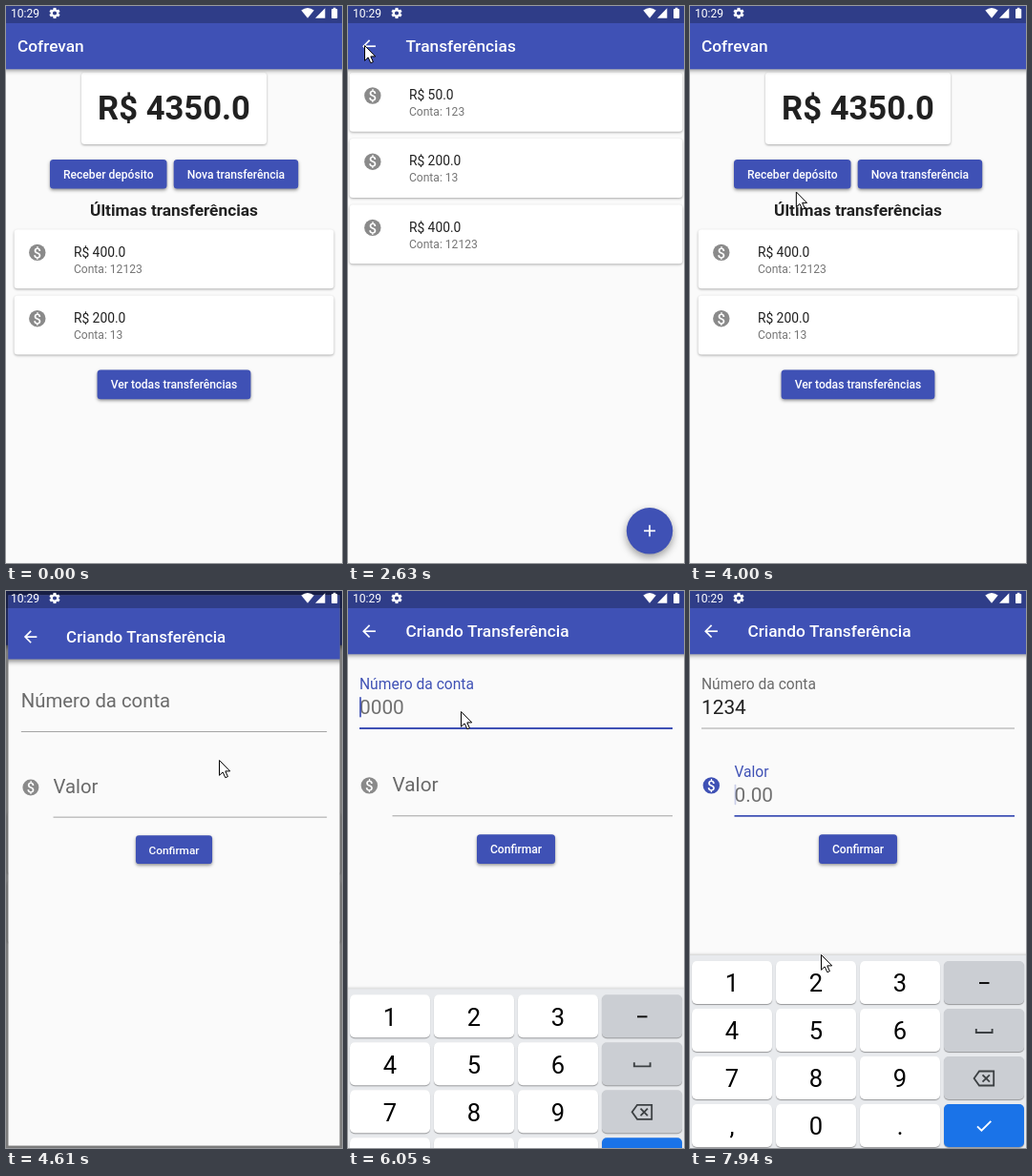
Write an HTML page with a canvas that moves like this. It is 352 by 584 pixels and loops after 8000 ms.

```html
<!DOCTYPE html>
<html lang="pt">
<head>
<meta charset="utf-8">
<style>
html, body { margin: 0; width: 352px; height: 584px; overflow: hidden; background: #fafafa; }
canvas { display: block; }
</style>
</head>
<body>
<canvas id="stage" width="352" height="584"></canvas>
<script>
const ctx = document.getElementById('stage').getContext('2d');
const LOOP = 8000, U = 0.865; // U: pixels per layout unit
const INDIGO = '#3f51b5', DARK = '#212121', GREY = '#757575', PAPER = '#fafafa';
const SCREEN = { x: -1.9, y: -2.7, w: 355.8, h: 591.4, cx: 176, cy: 293 };

const clamp = v => Math.max(0, Math.min(1, v));
const span = (t, start, length) => clamp((t - start) / length);
const mix = (a, b, p) => a + (b - a) * p;
const smooth = p => p * p * (3 - 2 * p);
const easeOut = (p, n) => 1 - (1 - p) ** n;

function text(str, x, y, size, color, weight = 400, align = 'left') {
  ctx.font = `${weight} ${size}px Roboto, sans-serif`;
  ctx.textAlign = align;
  ctx.fillStyle = color;
  ctx.fillText(str, x, y);
}

function box(x, y, w, h, r, color, shade) {
  ctx.save();
  if (shade) {
    ctx.shadowColor = `rgba(0,0,0,${shade[2]})`;
    ctx.shadowOffsetY = shade[0];
    ctx.shadowBlur = shade[1];
  }
  ctx.fillStyle = color;
  ctx.beginPath();
  ctx.roundRect(x, y, w, h, r);
  ctx.fill();
  ctx.restore();
}

function disc(x, y, r, color) {
  ctx.fillStyle = color;
  ctx.beginPath();
  ctx.arc(x, y, r, 0, 7);
  ctx.fill();
}

function line(points, color, width) {
  ctx.strokeStyle = color;
  ctx.lineWidth = width;
  ctx.beginPath();
  points.forEach(([x, y]) => ctx.lineTo(x, y));
  ctx.stroke();
}

function poly(points, color) {
  ctx.fillStyle = color;
  ctx.beginPath();
  points.forEach(([x, y]) => ctx.lineTo(x, y));
  ctx.fill();
}

function coin(x, y, color) {
  disc(x, y, 8.7, color);
  text('$', x, y + 5.2, 15, '#fff', 500, 'center');
}

function card(x, y, w, h) {
  box(x, y, w, h, 3.5, '#fff', [1, 2.5, 0.32]);
}

function button(x, y, w, label) {
  box(x, y, w, 30.6, 3.5, INDIGO, [1.6, 3.5, 0.42]);
  text(label, x + w / 2, y + 19.8, 12.1, '#fff', 500, 'center');
}

function appBar(title, back) {
  box(-10, -10, 372, 76.3, 0, INDIGO, [2, 5, 0.45]);
  text(title, back ? 60.4 : 12, 48.3, 17.3, '#fff', 500);
  if (back) {
    line([[28.9, 42.2], [16.6, 42.2]], '#fff', 1.7);
    line([[22.6, 35.9], [16.3, 42.2], [22.6, 48.5]], '#fff', 1.7);
  }
}

function transferRow(x, y, w, value, account) {
  card(x, y, w, 62);
  coin(x + 24.2, y + 24.2, '#8a8a8a');
  text('R$ ' + value, x + 62.3, y + 28.3, 13.84, DARK);
  text('Conta: ' + account, x + 62.3, y + 45.3, 12.1, GREY);
}

function homePage() {
  card(79, 69.5, 194, 75.5);
  text('R$ 4350.0', 176, 119, 34.6, DARK, 700, 'center');
  button(46, 161, 122.5, 'Receber depósito');
  button(175.7, 161, 130.5, 'Nova transferência');
  text('Últimas transferências', 176, 220.2, 17.3, DARK, 700, 'center');
  transferRow(8.6, 234.2, 334.8, '400.0', '12123');
  transferRow(8.6, 303.5, 334.8, '200.0', '13');
  button(95.6, 381.6, 160.8, 'Ver todas transferências');
  appBar('Cofrevan', false);
}

function listPage() {
  [['50.0', '123'], ['200.0', '13'], ['400.0', '12123']].forEach(([value, account], i) =>
    transferRow(1.6, 69.8 + i * 69.2, 348.8, value, account));
  ctx.save();
  ctx.shadowColor = 'rgba(0,0,0,.4)';
  ctx.shadowOffsetY = 3.5;
  ctx.shadowBlur = 8;
  disc(316, 550.3, 24.2, INDIGO);
  ctx.restore();
  line([[310, 550.3], [322, 550.3]], '#fff', 1.7);
  line([[316, 544.3], [316, 556.3]], '#fff', 1.7);
  appBar('Transferências', true);
}

// rise: how far the label has floated up; base: height of the underline
function field(x, base, label, hint, value, rise, focused, caret) {
  text(label, x, base - mix(25.8, 41, rise), 20.8 * mix(1, 0.75, rise), focused ? INDIGO : '#6a6a6a');
  if (value) {
    text(value, x, base - 14.9, 20.8, DARK);
  } else if (rise > 0) {
    ctx.save();
    ctx.globalAlpha *= rise;
    text(hint, x, base - 14.9, 20.8, '#707070');
    ctx.restore();
  }
  if (focused) {
    line([[x, base], [340, base]], INDIGO, 1.8);
    const caretX = x + 0.9 + ctx.measureText(value).width * (value ? 1 : 0);
    ctx.save();
    ctx.globalAlpha *= caret;
    box(caretX - 0.8, base - 33, 1.7, 21.5, 0.8, INDIGO);
    ctx.restore();
  } else {
    line([[x, base], [340, base]], '#989898', 0.9);
  }
}

const FOCUS_ACCOUNT = 5610, FOCUS_VALUE = 7330;
const KEY_TIMES = [6370, 6500, 6715, 6850];

function caretAlpha(t, since) {
  const phase = (t - since) % 1000;
  return phase < 500 ? 1 : phase < 850 ? 1 - span(phase, 500, 150) : span(phase, 850, 150);
}

function formPage(t) {
  const typed = KEY_TIMES.filter(k => t >= k);
  const onAccount = t >= FOCUS_ACCOUNT && t < FOCUS_VALUE;
  const onValue = t >= FOCUS_VALUE;
  const lastEdit = typed.length ? typed[typed.length - 1] : FOCUS_ACCOUNT;
  field(12, 144, 'Número da conta', '0000', '1234'.slice(0, typed.length),
    smooth(span(t, FOCUS_ACCOUNT, 200)), onAccount, caretAlpha(t, lastEdit));
  coin(22.3, 203.9, onValue ? INDIGO : '#8a8a8a');
  field(46.5, 235.8, 'Valor', '0.00', '',
    smooth(span(t, FOCUS_VALUE, 200)), onValue, caretAlpha(t, FOCUS_VALUE));
  button(135, 255.3, 82, 'Confirmar');
  appBar('Criando Transferência', true);
}

function page(draw, t, scale = 1, alpha = 1) {
  ctx.save();
  ctx.globalAlpha = alpha;
  ctx.translate(SCREEN.cx, SCREEN.cy);
  ctx.scale(scale, scale);
  ctx.translate(-SCREEN.cx, -SCREEN.cy);
  ctx.beginPath();
  ctx.rect(SCREEN.x, SCREEN.y, SCREEN.w, SCREEN.h);
  ctx.clip();
  ctx.fillStyle = PAPER;
  ctx.fillRect(SCREEN.x, SCREEN.y, SCREEN.w, SCREEN.h);
  draw(t);
  ctx.restore();
}

function openPage(from, to, t, start) {
  const p = span(t, start, 300), e = easeOut(p, 5);
  page(from, t, mix(1, 1.05, e));
  ctx.fillStyle = `rgba(0,0,0,${0.5 * clamp(p * 4)})`;
  ctx.fillRect(0, 0, 352, 584);
  page(to, t, mix(0.85, 1, e), span(p, 0.125, 0.125));
}

function closePage(from, to, t, start) {
  const p = span(t, start, 480), e = easeOut(p, 5);
  page(to, t, mix(1.1, 1, e));
  const alpha = 1 - span(p, 0.08, 0.125);
  if (alpha > 0) page(from, t, mix(1, 0.9, e), alpha);
}

function pages(t) {
  if (t < 1310) page(homePage, t);
  else if (t < 1610) openPage(homePage, listPage, t, 1310);
  else if (t < 3040) page(listPage, t);
  else if (t < 3520) closePage(listPage, homePage, t, 3040);
  else if (t < 4518) page(homePage, t);
  else if (t < 4818) openPage(homePage, formPage, t, 4518);
  else page(formPage, t);
}

function statusBar() {
  ctx.fillStyle = 'rgba(0,0,0,.25)';
  ctx.fillRect(0, 0, 352, 18);
  text('10:29', 5, 12.2, 12.1, '#fff');
  for (let i = 0; i < 6; i++) {
    const a = i * Math.PI / 3 + Math.PI / 6, c = Math.cos(a), s = Math.sin(a);
    line([[51 + c * 2.8, 7.5 + s * 2.8], [51 + c * 5.6, 7.5 + s * 5.6]], '#fff', 3);
  }
  ctx.strokeStyle = '#fff';
  ctx.lineWidth = 2.2;
  ctx.beginPath();
  ctx.arc(51, 7.5, 3.2, 0, 7);
  ctx.stroke();
  ctx.fillStyle = '#fff';
  ctx.beginPath();
  ctx.moveTo(316, 12.8);
  ctx.lineTo(309.3, 4.6);
  ctx.quadraticCurveTo(316, -0.4, 322.7, 4.6);
  ctx.fill();
  poly([[324, 12.8], [334.3, 12.8], [334.3, 2.3]], '#fff');
  box(341, 3, 6.2, 10, 0.8, '#fff');
  box(342.8, 1.8, 2.6, 2, 0, '#fff');
}

function keyIcon(row) {
  const y = 411 + row * 50, ink = '#3c4043';
  if (row === 0) line([[303, y], [313.5, y]], '#111', 2);
  if (row === 1) line([[299.8, y - 2], [299.8, y + 2], [316.6, y + 2], [316.6, y - 2]], ink, 1.9);
  if (row === 2) {
    ctx.strokeStyle = ink;
    ctx.lineWidth = 1.8;
    ctx.beginPath();
    [[297.6, y], [303, y - 7.5], [318.2, y - 7.5], [318.2, y + 7.5], [303, y + 7.5]]
      .forEach(([x, py]) => ctx.lineTo(x, py));
    ctx.closePath();
    ctx.stroke();
    line([[306.5, y - 3.7], [313.9, y + 3.7]], ink, 1.8);
    line([[306.5, y + 3.7], [313.9, y - 3.7]], ink, 1.8);
  }
  if (row === 3) line([[301, y + 0.3], [305.4, y + 4.7], [315.3, y - 5.2]], '#fff', 1.9);
}

function keyboard(t) {
  const p = easeOut(span(t, 5870, 310), 2);
  if (p === 0) return;
  ctx.save();
  ctx.translate(0, 204 * (1 - p));
  box(-5, 382, 362, 240, 0, '#e8eaed', [-1, 3, 0.2]);
  ['123', '456', '789', ',0.'].forEach((keys, row) => {
    const y = 388 + row * 50;
    for (let col = 0; col < 4; col++) {
      const x = 2 + col * 88;
      const color = col < 3 ? '#fff' : row < 3 ? '#cbced3' : '#1a73e8';
      box(x, y, 84, 45, 5, color, [1, 1, 0.35]);
      if (col < 3) text(keys[col], x + 42, y + 32.2, 25.5, '#000', 400, 'center');
    }
    keyIcon(row);
  });
  ctx.restore();
}

// time, x, y
const POINTER = [
  [370, 246, 586], [1130, 178, 392], [1200, 178, 392], [1260, 189, 397], [1530, 189, 397],
  [1600, 189, 404], [1800, 189, 404], [2560, 14, 43], [2630, 17, 41], [3270, 17, 41],
  [3720, 33, 222], [4340, 214, 158], [4470, 223, 177], [4820, 223, 177], [5300, 118, 123],
  [5850, 118, 123], [5920, 118, 126], [6870, 118, 126], [7130, 140, 212], [7480, 140, 212],
  [7930, 137, 381]
];

function pointer(t) {
  if (t < POINTER[0][0]) return;
  const i = POINTER.findIndex(k => k[0] > t);
  const b = i < 0 ? POINTER[POINTER.length - 1] : POINTER[i];
  const a = i < 0 ? b : POINTER[i - 1];
  const p = i < 0 ? 1 : smooth(span(t, a[0], b[0] - a[0]));
  ctx.save();
  ctx.translate(mix(a[1], b[1], p) + 0.5, mix(a[2], b[2], p) + 0.5);
  ctx.beginPath();
  [[0, 0], [0, 15.8], [3.6, 12.4], [6.3, 18.2], [8.9, 17.1], [6.3, 11.4], [11.2, 11.4]]
    .forEach(([x, y]) => ctx.lineTo(x, y));
  ctx.closePath();
  ctx.fillStyle = '#fff';
  ctx.strokeStyle = '#000';
  ctx.lineWidth = 1;
  ctx.fill();
  ctx.stroke();
  ctx.restore();
}

function frame() {
  const t = performance.now() % LOOP;
  pages(t);
  statusBar();
  keyboard(t);
  pointer(t);
  requestAnimationFrame(frame);
}
frame();
</script>
</body>
</html>
```
